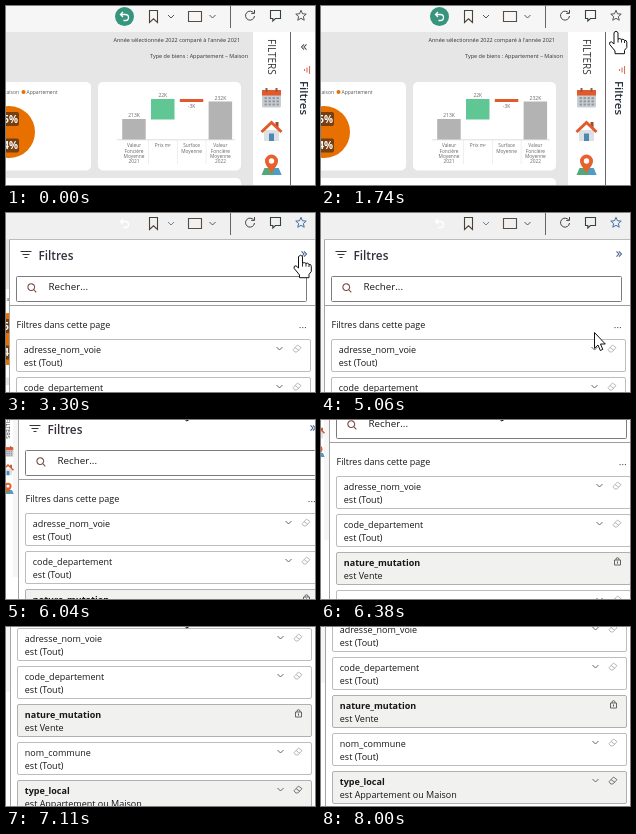
An HTML page with a canvas that plays this animation: 309 by 179 pixels, repeating every 9060 ms.

```html
<!DOCTYPE html>
<html lang="fr">
<head>
<meta charset="utf-8">
<title>Volet Filtres</title>
<style>
html, body { margin: 0; width: 100%; height: 100%; overflow: hidden; background: #fff; }
canvas { display: block; width: 309px; height: 179px; }
</style>
</head>
<body>
<canvas id="stage"></canvas>
<script>
const LOOP = 9060, W = 309, H = 179;
const OPEN = 3160, REFLOW = 3710;
const canvas = document.getElementById('stage');
const ratio = window.devicePixelRatio || 1;
canvas.width = W * ratio;
canvas.height = H * ratio;
const ctx = canvas.getContext('2d', { alpha: false });

const FONT = '"Open Sans", "Noto Sans", sans-serif';
const ORANGE = '#e87000', RED = '#e2592c', INK = '#161616';

const HAND = new Path2D('M-2 1.5Q0-1 2 1.5V8.2Q3.8 6.8 5.5 8.4Q7.2 7.6 8.5 9.3Q10.6 9 10.8 11.3V16.5L8.5 19.3V22.7H-1V20L-6.4 13.3Q-7 10.6-4.5 10.8L-2 13Z');
const ARROW = new Path2D('M.5.5V16.3L4 13L6.3 18.5L8.8 17.4L6.5 12H11.3Z');

function box(x, y, w, h, color) {
  ctx.fillStyle = color;
  ctx.fillRect(x, y, w, h);
}

function rounded(x, y, w, h, r, fill, border) {
  ctx.beginPath();
  ctx.roundRect(x, y, w, h, r);
  if (fill) { ctx.fillStyle = fill; ctx.fill(); }
  if (border) { ctx.strokeStyle = border; ctx.lineWidth = 1; ctx.stroke(); }
}

function disc(x, y, r, color) {
  ctx.fillStyle = color;
  ctx.beginPath();
  ctx.arc(x, y, r, 0, 7);
  ctx.fill();
}

// y is the middle of the capitals; baselines sit on whole pixels.
function text(str, x, y, size, color = INK, weight = 400, align = 'left') {
  ctx.font = `${weight} ${size}px ${FONT}`;
  ctx.textAlign = align;
  ctx.textBaseline = 'alphabetic';
  ctx.fillStyle = color;
  ctx.fillText(str, x, Math.round(y + size * 0.35));
}

function stroke(d, color, width = 1) {
  ctx.strokeStyle = color;
  ctx.lineWidth = width;
  ctx.stroke(new Path2D(d));
}

function shape(d, color) {
  ctx.fillStyle = color;
  ctx.fill(new Path2D(d));
}

function at(x, y, draw, scale = 1, angle = 0) {
  ctx.save();
  ctx.translate(x, y);
  ctx.rotate(angle);
  ctx.scale(scale, scale);
  draw();
  ctx.restore();
}

const sideways = (str, x, y, size, color, weight) =>
  at(x, y, () => text(str, 0, 0, size, color, weight), 1, Math.PI / 2);

const chevron = (x, y, color) => at(x, y, () => stroke('M-3-1.5L0 1.5L3-1.5', color));

const double = (x, y, dir, color) =>
  at(x, y, () => stroke(`M0-2.7L${2.5 * dir} 0L0 2.7M${-2.5 * dir}-2.7L0 0L${-2.5 * dir} 2.7`, color, 1.1));

function toolbar(open) {
  box(0, 0, W, 26, open ? '#f0f0f0' : '#f6f6f6');
  if (!open) disc(118.5, 10.5, 9.5, '#37957d');
  at(118.5, 10.5, () => stroke('M-1.5-4.5L-4-2L-1.5.5M-4-2H1A3 3 0 0 1 1 4H-1', '#fff', 1.3));
  stroke('M143.5 4.5H151.5V16.5L147.5 12.8L143.5 16.5Z', '#4a4138', 1.1);
  chevron(165, 10.5, open ? '#6484a0' : '#555');
  stroke('M182.5 5.5H195.5V15.5H182.5Z', '#5a4c40', 1.1);
  chevron(206.5, 10.5, '#555');
  box(224, 0, 1, 22, '#666');
  stroke('M247.8 7.2A4.5 4.5 0 1 0 248.5 10M248.5 4V7.4H245.2', '#444');
  stroke('M264.5 4.5H274.5V12.5H269.5L266.8 15V12.5H264.5Z', '#34423d', 1.1);
  ctx.beginPath();
  for (let i = 0; i < 10; i++) {
    const r = i % 2 ? 2.5 : 5.5, a = i * Math.PI / 5 - Math.PI / 2;
    ctx.lineTo(295 + r * Math.cos(a), 9.8 + r * Math.sin(a));
  }
  ctx.closePath();
  ctx.strokeStyle = open ? '#3f6fa5' : '#555';
  ctx.lineWidth = 1;
  ctx.stroke();
}

function calendar() {
  rounded(-9.5, -8, 19, 17.5, 1.5, '#c9ced3');
  box(-9.5, -8, 19, 5.5, RED);
  box(-6, -10, 2, 4, '#8d5a4c');
  box(4, -10, 2, 4, '#8d5a4c');
  for (let i = 0; i < 12; i++) box(-7 + i % 4 * 4, -0.8 + Math.floor(i / 4) * 3.2, 2.4, 1.9, '#8f969c');
}

function house() {
  box(-7.5, -1, 15, 11, '#dde1e4');
  box(4, -9, 3, 6, '#9b4a34');
  stroke('M-10 1L0-8.5L10 1', RED, 3);
  box(-2.5, 2.5, 5, 7.5, '#4d88b5');
}

function pin() {
  shape('M-10 10L-7 3H7L10 10Z', '#54a878');
  shape('M1 10L3 3H7L10 10Z', '#4d9dc8');
  shape('M0 8C-3 3-6.5 0-6.5-4A6.5 6.5 0 0 1 6.5-4C6.5 0 3 3 0 8Z', '#e8612c');
  disc(0, -4, 2.7, '#fff');
}

function tabIcons(x, y, scale) {
  at(x, y, () => {
    sideways('FILTERS', 0, -18, 10, '#333');
    at(0, 41, calendar);
    at(0, 74, house);
    at(0, 108, pin);
  }, scale);
}

function pie() {
  disc(3, 126, 26, ORANGE);
  for (const [label, y] of [['45%', 113], ['54%', 139.5]]) {
    rounded(-14, y - 7, 27, 14, 2, 'rgba(84,50,20,.78)');
    text(label, 12, y, 10, '#fff', 700, 'right');
  }
}

function waterfall() {
  const bars = [
    [113, 20.5, '#b3b3b3', '213K', 109.5, ['Valeur', 'Foncière', 'Moyenne', '2021']],
    [93, 20.5, '#60c694', '22K', 89.5, ['Prix m²']],
    [93, 3, RED, '-3K', 100, ['Surface', 'Moyenne']],
    [95.5, 38, '#b3b3b3', '232K', 92, ['Valeur', 'Foncière', 'Moyenne', '2022']]
  ];
  box(111, 133.5, 118, 0.7, '#cfcfcf');
  bars.forEach(([y, h, color, value, labelY, lines], i) => {
    const mid = 128 + i * 28.8;
    box(mid - 11.8, y, 23.5, h, color);
    text(value, mid, labelY, 5, '#666', 400, 'center');
    lines.forEach((s, k) => text(s, mid, 139.5 + k * 5.4, 4.8, '#666', 400, 'center'));
    if (i) box(mid - 14.6, 134, 0.5, 24, '#dedede');
  });
}

function report(t) {
  box(0, 26, 247, 153, '#e6e6e6');
  text("Année sélectionnée 2022 comparé à l'année 2021", 107.5, 34, 5.5, '#333');
  text('Type de biens : Appartement – Maison', 144, 50, 5.5, '#333');
  rounded(-12, 76, 97, 88.5, 5, '#fff');
  rounded(92, 76, 143, 88.5, 5, '#fff');
  rounded(-12, 172, 247, 20, 5, '#fff');
  text('Maison', 13, 86, 5, '#555', 400, 'right');
  disc(17.5, 86, 2, ORANGE);
  text('Appartement', 20.5, 86, 5, '#555');
  pie();
  waterfall();
  box(247, 26, 62, 153, '#fff');
  tabIcons(265.5, 51, 1);
  box(284, 26, 1, 153, '#6a6670');
  if (t >= 2960) box(282, 30, 24, 24, '#ebebeb');
  double(298, 41, -1, '#5c4a5e');
  stroke('M303.5 60V68M301 61.5V66.5M298.5 63V65', '#d8705c', 1.1);
  sideways('Filtres', 298, 75, 11.5, '#25303c', 600);
}

function eraser(x, y, color) {
  at(x, y, () => stroke('M-4 1.2L.5-3.5L4-.8L-.2 3.5H-2.2ZM-2-1L2 2', color, 0.9));
}

function lock(x, y) {
  at(x, y, () => {
    stroke('M-2.5-1.5H3.5V3.5H-2.5ZM-1-1.5V-2.3A1.5 1.5 0 0 1 2-2.3V-1.5', '#555', 0.9);
    box(0, 0, 1, 2, '#555');
  });
}

const FIELDS = [
  ['adresse_nom_voie', 'est (Tout)'],
  ['code_departement', 'est (Tout)'],
  ['nature_mutation', 'est Vente', true],
  ['nom_commune', 'est (Tout)'],
  ['type_local', 'est Appartement ou Maison', true]
];

function field([name, rule, active], i) {
  const y = 126.5 + i * 38;
  rounded(10.5, y, 294, 32, 1.5, active ? '#f1f1f0' : '#fff', active ? '#b0b0b0' : '#bdbdbd');
  text(name, 17.8, y + 10, 9, INK, active ? 700 : 400);
  text(rule, 17.8, y + 23.2, 9);
  if (i === 2) return lock(291, y + 9);
  chevron(273.5, y + 9, '#666');
  eraser(291, y + 9, active ? '#666' : '#b0b0b0');
}

function panel() {
  box(3, 26, 320, 400, '#fff');
  box(3, 26, 1, 400, '#a5a5a5');
  box(3, 26, 320, 1, '#bcbcbc');
  stroke('M14.5 38.5H25.5M16.5 41.5H23.5M18.5 44.5H21.5', '#3a3038');
  text('Filtres', 32.5, 42.6, 11.8, '#35303c', 600);
  double(298, 41, 1, '#4a6290');
  rounded(10.5, 63.5, 290, 25, 1, '#fff', '#7c7c7c');
  stroke('M27.6 76.6A3.4 3.4 0 1 1 27.7 76.5L30.3 79.3', '#7d5048', 1.1);
  text('Recher...', 42.5, 74, 9.8);
  box(4, 92, 320, 1, '#9d9d9d');
  text('Filtres dans cette page', 10.5, 112, 9);
  for (let i = 0; i < 3; i++) box(293.5 + i * 2.7, 114, 1.1, 1.1, '#555');
  FIELDS.forEach(field);
}

// The report has shrunk to a narrow edge left of the panel.
function edge() {
  box(-20, 26, 23, 164, '#f6f6f6');
  box(-20, 26, 18, 164, '#fff');
  box(-20, 190, 23, 240, '#fff');
  tabIcons(-7, 42, 0.55);
}

// Linear path through [time, x, y] points, advanced at the recording's frame rate.
function follow(points, t, step = 69) {
  const start = points[0][0], last = points[points.length - 1];
  if (t >= last[0]) return last.slice(1);
  const now = start + Math.max(0, Math.floor((t - start) / step)) * step;
  const i = points.findIndex(p => p[0] > now);
  const [t0, x0, y0] = points[i - 1], [t1, x1, y1] = points[i];
  const k = (now - t0) / (t1 - t0);
  return [x0 + (x1 - x0) * k, y0 + (y1 - y0) * k];
}

function camera(t) {
  if (t < 5700) return [0, 0];
  const path = t < 6630
    ? [[5700, 2, -4], [6040, 9, -33], [6570, 3, -91]]
    : [[6630, 2, -97], [7250, 1, -133], [7400, 1, -134]];
  return follow(path, t, 68).map(Math.round);
}

function cursor(t) {
  if (t < 790 || (t >= 1480 && t < 1740) || t >= 7920) return;
  let kind = ARROW, spot;
  if (t < 1480) spot = follow([[790, 108, 163], [1140, 205, 112], [1480, 309, 57]], t);
  else if (t < 4120) {
    kind = HAND;
    spot = follow([[1740, 295, 25], [1880, 282, 6], [2020, 292, 46], [2160, 294.5, 42]], t, 70);
  } else if (t < 5060) {
    spot = follow([[4120, 270, 58], [4260, 180, 138], [4330, 144, 160], [4530, 273, 119]], t);
  } else spot = follow([[5060, 273, 119], [5550, 174, -17.5]], t, 70);
  at(spot[0], spot[1], () => {
    ctx.fillStyle = '#fff';
    ctx.fill(kind);
    ctx.strokeStyle = '#111';
    ctx.lineWidth = 1;
    ctx.stroke(kind);
    if (kind === HAND) stroke('M2 8.2V11.6M5.5 8.6V11.6M8.5 9.5V12', '#111', 0.9);
  });
}

function draw(t) {
  ctx.setTransform(ratio, 0, 0, ratio, 0, 0);
  box(0, 0, W, H, '#fff');
  const [x, y] = camera(t);
  at(x, y, () => {
    if (t < REFLOW) report(t);
    else edge();
    toolbar(t >= OPEN);
    if (t >= OPEN) panel();
  });
  cursor(t);
}

const begin = performance.now();
function tick() {
  draw((performance.now() - begin) % LOOP);
  requestAnimationFrame(tick);
}
tick();
</script>
</body>
</html>
```
